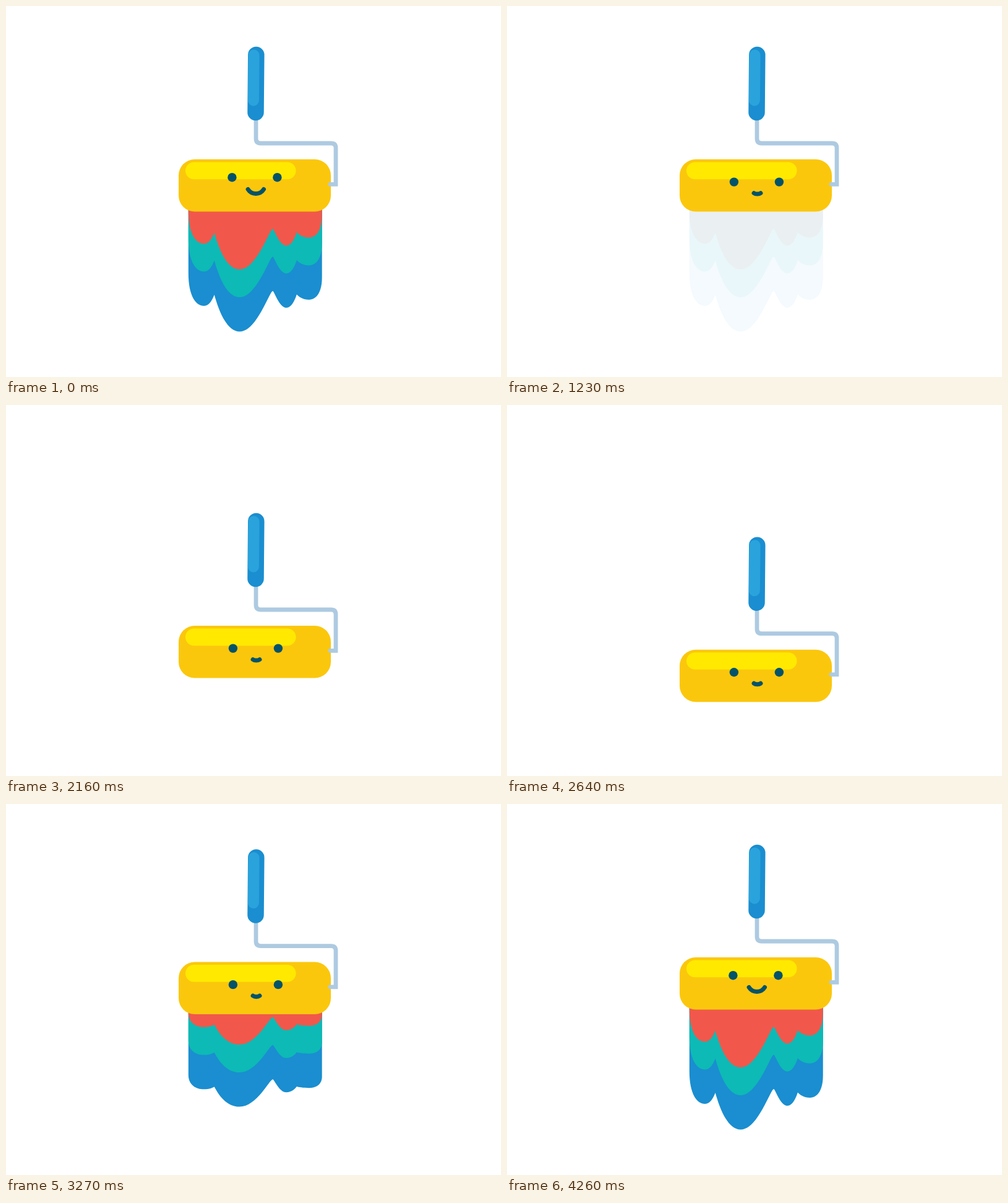
An HTML page for the animation above (4.32 s loop, 800x600 px).

```html
<!DOCTYPE html>
<html lang="en">
<head>
<meta charset="utf-8">
<title>Paint roller</title>
<style>
  html, body { margin: 0; width: 100%; height: 100%; overflow: hidden; background: #fff; }
  svg { display: block; width: 800px; height: 600px; }
  .line { fill: none; stroke-linecap: round; }
</style>
</head>
<body>
<svg viewBox="0 0 800 600">
  <clipPath id="below"><rect id="edge" x="250" y="290" width="300" height="400"/></clipPath>
  <g clip-path="url(#below)">
    <path class="paint" fill="#1a8ed0"/>
    <path class="paint" fill="#0dbab5" transform="translate(0 -55.5)"/>
    <path class="paint" fill="#f1584b" transform="translate(0 -100.5)"/>
  </g>
  <g id="roller">
    <rect x="279" y="248" width="246" height="84.5" rx="26" fill="#fbc70d"/>
    <rect x="290" y="252.5" width="178.5" height="27.7" rx="13.8" fill="#ffe900"/>
    <path class="line" d="M404 180V214.500Q404 222 411.500 222H525.500Q533 222 533 229.500V288.300H524"
      stroke="#adcae1" stroke-width="6.800"/>
    <path class="line" d="M404.300 79L403.500 172" stroke="#1a8ed0" stroke-width="26.500"/>
    <path class="line" d="M400.600 79.500L399.900 152.500" stroke="#2aa3dc" stroke-width="18"/>
    <g id="eyes" fill="#03536a">
      <circle cx="365.400" cy="277.200" r="7.200"/>
      <circle cx="438.400" cy="277.200" r="7.200"/>
    </g>
    <path id="mouth" class="line" stroke="#03536a" stroke-width="7"/>
  </g>
</svg>
<script>
const LOOP = 4320, STEP = 30, DROP = 158.2;
const $ = id => document.getElementById(id);
const layers = [...document.querySelectorAll('.paint')];

const clamp = v => Math.min(1, Math.max(0, v));
const mix = (a, b, p) => a + (b - a) * p;
const smooth = p => p * p * (3 - 2 * p);
const progress = (t, from, to) => clamp((t - from) / (to - from));
const ease = (t, from, to) => smooth(progress(t, from, to));

// Bezier ease with flat ends: x1 and x2 set how long each end lingers.
function bezier(x, x1, x2) {
  let lo = 0, hi = 1;
  for (let i = 0; i < 24; i++) {
    const u = (lo + hi) / 2, v = 1 - u;
    if (3 * v * v * u * x1 + 3 * v * u * u * x2 + u * u * u < x) lo = u;
    else hi = u;
  }
  return smooth(lo);
}

// How a curve leaves each kind of point, as a share of the way to its neighbour.
const wall = [0, 0.7], lobe = [0.52, 0], cusp = [0.16, 0.4], peak = [0.1, 0];

// Lower paint edge: kind, x, y half grown, y fully grown.
const rim = [
  [wall, 294.8, 438, 432],
  [lobe, 320, 461, 485],
  [cusp, 336.7, 457, 467],
  [lobe, 377.5, 489, 526.5],
  [peak, 431.2, 445, 461],
  [lobe, 453, 466, 488],
  [cusp, 469.8, 457, 466.5],
  [lobe, 490, 459, 475],
  [wall, 510.7, 441, 439],
];

function paintPath(grown) {
  const pts = rim.map(([kind, x, half, full]) => ({ kind, x, y: mix(half, full, 2 * grown - 1) }));
  const handle = (a, b) => `${mix(a.x, b.x, a.kind[0])} ${mix(a.y, b.y, a.kind[1])}`;
  const curves = pts.slice(1).map((b, i) =>
    `C${handle(pts[i], b)} ${handle(b, pts[i])} ${b.x} ${b.y}`);
  return `M${pts[0].x} 200V${pts[0].y}${curves.join('')}V200Z`;
}

function draw(t) {
  const down = ease(t, 1855, 2340);
  const up = bezier(progress(t, 2430, 3400), 0.516, 0.632);
  const y = DROP * (down - up);
  $('roller').setAttribute('transform', `translate(0 ${y})`);
  $('edge').setAttribute('y', 290 + y);

  // The first coat fades away; the second grows while the roller rises.
  const fading = t < 2400;
  const grown = fading ? 1 : 1 - (1 - progress(t, 2760, 4260)) ** 1.7;
  const d = paintPath(grown);
  for (const layer of layers) {
    layer.setAttribute('d', d);
    layer.setAttribute('opacity', fading ? 1 - progress(t, 0, 1290) : 1);
  }

  const look = ease(t, 480, 850) - ease(t, 3500, 3880);
  $('eyes').setAttribute('transform', `translate(${1.5 * look} ${7.4 * look})`);

  const pout = ease(t, 630, 1050) - ease(t, 3590, 4000);
  const cx = mix(403.8, 404.5, pout), half = mix(12.7, 5.4, pout);
  const top = mix(296.5, 302.6, pout), low = top + mix(9.2, 2, pout);
  $('mouth').setAttribute('d',
    `M${cx - half} ${top}C${cx - half * 0.55} ${low} ${cx + half * 0.55} ${low} ${cx + half} ${top}`);
}

const start = performance.now();
function tick() {
  const t = (performance.now() - start) % LOOP;
  draw(Math.min(LOOP - 2 * STEP, Math.floor(t / STEP) * STEP));
  requestAnimationFrame(tick);
}
tick();
</script>
</body>
</html>
```
